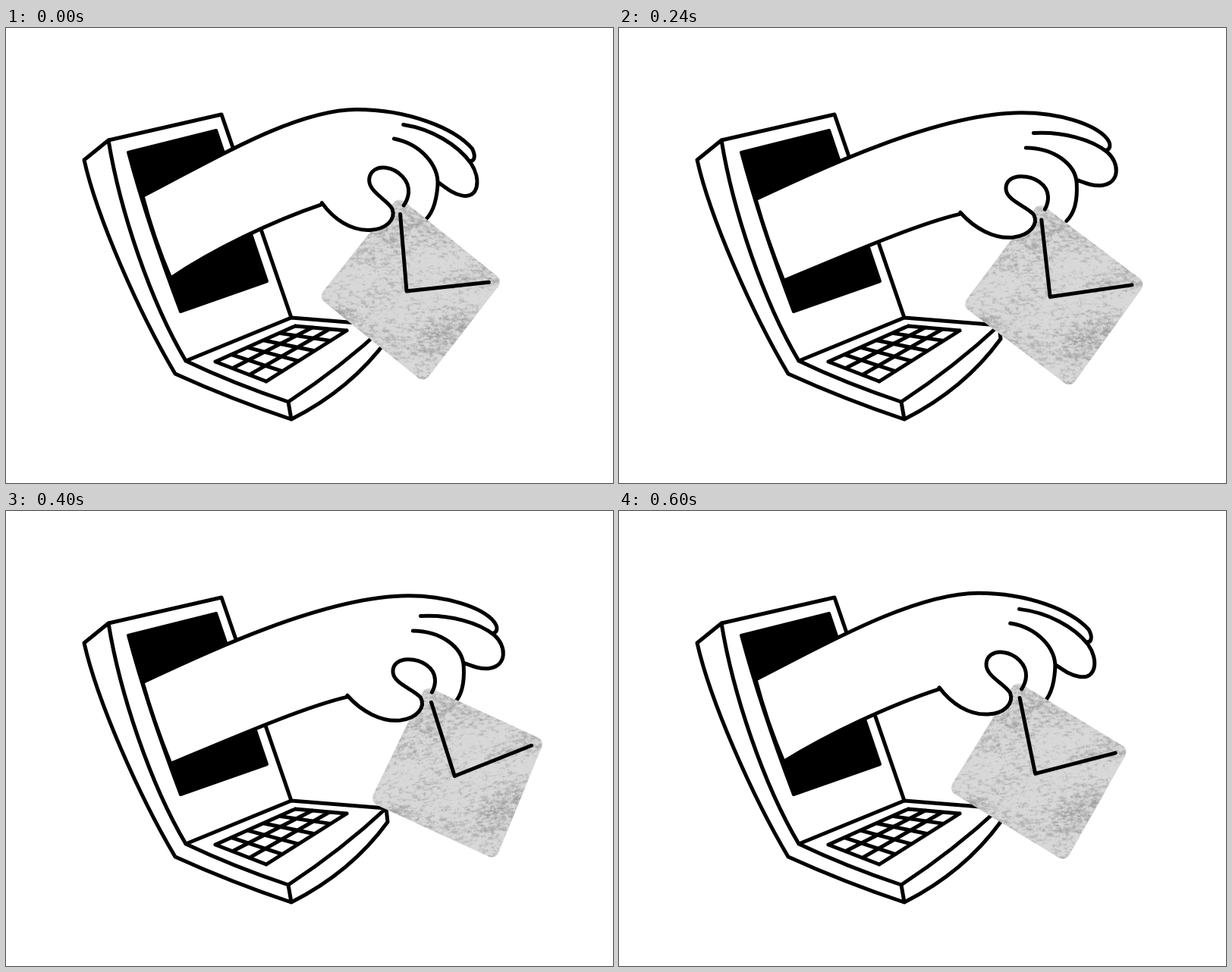
An HTML page with a canvas that plays this animation: 800x600 px, repeating every 640 ms.

```html
<!DOCTYPE html>
<html lang="en">
<head>
<meta charset="utf-8">
<title>Hand delivering a letter</title>
<style>
html, body { margin: 0; width: 100%; height: 100%; overflow: hidden; background: #fff; }
canvas { display: block; }
</style>
</head>
<body>
<canvas id="stage" width="800" height="600"></canvas>
<script>
const ctx = document.getElementById('stage').getContext('2d');
const LOOP = 640;
const TURN = 2 * Math.PI;

// Hand strokes at mid swing: a start point, then cubic curves.
const finger = [537,134, 575,135, 612,150, 631,170, 646,187, 645,213, 622,213, 610,213, 600,207, 590,202];
const knuckle = [526,153, 562,156, 589,180, 589,206, 589,228, 585,245, 573,255];
const thumb = [436,238, 453,259, 478,274, 503,272, 525,270, 537,256, 531,243, 524,232, 497,223, 497,207];
const pinch = [497,207, 497,196, 507,190, 518,191, 536,192, 551,205, 551,220, 551,228, 549,232, 546,237];
const fingertip = [631,151, 637,160, 635,167, 629,167];

const laptop = new Path2D(
  'M135 148L284 114L376 382L501 392L503 410Q455 476 376 516Q298 490 223 456' +
  'C175 375 120 250 103 174L135 148C150 240 190 360 237 439L376 382' +
  'M237 439Q300 469 372 493L376 516M372 493Q442 447 501 392');
const screen = new Path2D('M161 164L277 135L344 334L230 374Q186 258 161 164Z');
const keys = makeKeys();
const paper = makePaper(260);

function mix(a, b, k) { return a + (b - a) * k; }

function makeKeys() {
  const [a, b, c, d] = [[276, 440], [381, 393], [449, 399], [343, 466]];
  const path = new Path2D();
  const rule = (p, q, r, s, n) => {
    for (let i = 0; i <= n; i++) {
      const k = i / n;
      path.moveTo(mix(p[0], q[0], k), mix(p[1], q[1], k));
      path.lineTo(mix(r[0], s[0], k), mix(r[1], s[1], k));
    }
  };
  rule(a, b, d, c, 5);
  rule(a, d, b, c, 3);
  return path;
}

function hash(x, y) {
  const s = Math.sin(x * 127.1 + y * 311.7) * 43758.5453;
  return s - Math.floor(s);
}

function noise(x, y) {
  const i = Math.floor(x), j = Math.floor(y);
  return mix(mix(hash(i, j), hash(i + 1, j), x - i),
             mix(hash(i, j + 1), hash(i + 1, j + 1), x - i), y - j);
}

// Pale grey paper with smudged, slightly slanted streaks.
function makePaper(size) {
  const tile = document.createElement('canvas');
  tile.width = tile.height = size;
  const c = tile.getContext('2d');
  const img = c.createImageData(size, size);
  for (let i = 0; i < size * size; i++) {
    const x = i % size, y = Math.floor(i / size), v = y - x * .12;
    const dirt = noise(x / 40, v / 24) * .35 + noise(x / 5, v / 2) * .5 +
      noise(x / 1.3, y / 1.3) * .4 - .58;
    img.data.fill(216 - Math.min(75, Math.max(0, dirt) * 130), i * 4, i * 4 + 3);
    img.data[i * 4 + 3] = 255;
  }
  c.putImageData(img, 0, 0);
  const pattern = ctx.createPattern(tile, 'repeat');
  pattern.setTransform(new DOMMatrix([1, 0, 0, 1, -size / 2, -10]));
  return pattern;
}

// The hand slides outward while its fingers lift.
function sway(points, s) {
  const out = [];
  for (let i = 0; i < points.length; i += 2) {
    const x = points[i], y = points[i + 1];
    out.push(x + s * (19 + .08 * (y - 205) + .02 * (x - 538)),
             y + s * (8.5 - .0006 * (x - 458) ** 2 - .025 * (y - 205)));
  }
  return out;
}

function curve(path, p, join) {
  path[join ? 'lineTo' : 'moveTo'](p[0], p[1]);
  for (let j = 2; j < p.length; j += 6) path.bezierCurveTo(...p.slice(j, j + 6));
  return path;
}

function line(path, width = 5) {
  ctx.lineWidth = width;
  ctx.stroke(path);
}

function drawLaptop() {
  line(laptop);
  line(keys);
  ctx.fillStyle = '#000';
  ctx.fill(screen);
  line(screen, 4);
}

function drawArm(s) {
  const rise = 110 + 2.5 * s;
  const top = [180, 224 + 2.5 * s, 260, 185 + 4 * s, 403 + 25 * s, rise, 502 + 40 * s, rise,
    560 + 30 * s, rise, 612 + 21 * s, 129 - 3 * s, ...sway(fingertip, s)];
  const bottom = [...sway([436, 240], s), 375 + 25 * s, 257 + 2 * s,
    287 + 15 * s, 297 + 4 * s, 217, 332 + 2 * s];
  const arm = curve(curve(new Path2D(), top), bottom, true);
  arm.quadraticCurveTo(195, 279, top[0], top[1]);
  ctx.fillStyle = '#fff';
  ctx.fill(arm);

  const edge = curve(new Path2D(), bottom);
  edge.quadraticCurveTo(195, 279, top[0], top[1]);
  for (const part of [top, sway(finger, s), sway(knuckle, s)]) curve(edge, part);
  line(edge);
}

// The letter hangs from the grip; its far corners swing a little further.
function drawLetter(s, tilt) {
  const hub = 121, extra = tilt * .18;
  const far = (x, y) => [x * Math.cos(extra) - y * Math.sin(extra),
    hub + x * Math.sin(extra) + y * Math.cos(extra)];
  const sheet = new Path2D(), flap = new Path2D();
  sheet.moveTo(0, 10);
  sheet.lineTo(...far(113.5, -1));
  sheet.lineTo(...far(10.5, 108));
  sheet.lineTo(-102.5, hub - 2);
  sheet.closePath();
  flap.moveTo(0, 19);
  flap.lineTo(0, hub);
  flap.lineTo(...far(109, -1));

  ctx.save();
  ctx.translate(539.5 + 21.5 * s, 231 + 4.5 * s);
  ctx.rotate(tilt * .88);
  ctx.fillStyle = ctx.strokeStyle = paper;
  ctx.fill(sheet);
  line(sheet, 20);
  ctx.strokeStyle = '#000';
  line(flap);
  ctx.restore();
}

function drawThumb(s) {
  const tip = curve(new Path2D(), sway(thumb, s));
  ctx.fillStyle = '#fff';
  ctx.fill(tip);
  line(curve(tip, sway(pinch, s), true));
}

function frame(now) {
  // Poses are held for 80 ms, but only 40 ms at both ends of the swing.
  const t = now % LOOP;
  const hold = t % (LOOP / 2) < 80 ? 40 : 80;
  const pose = Math.floor(t / hold) * hold;
  const swing = -Math.cos(TURN * pose / LOOP);
  const tilt = -.178 * (1 - Math.cos(TURN * (pose - 110) / LOOP));

  ctx.fillStyle = '#fff';
  ctx.fillRect(0, 0, 800, 600);
  ctx.strokeStyle = '#000';
  ctx.lineCap = ctx.lineJoin = 'round';
  drawLaptop();
  drawArm(swing);
  drawLetter(swing, tilt);
  drawThumb(swing);
}

const start = performance.now();
function tick() {
  frame(performance.now() - start);
  requestAnimationFrame(tick);
}
tick();
</script>
</body>
</html>
```
